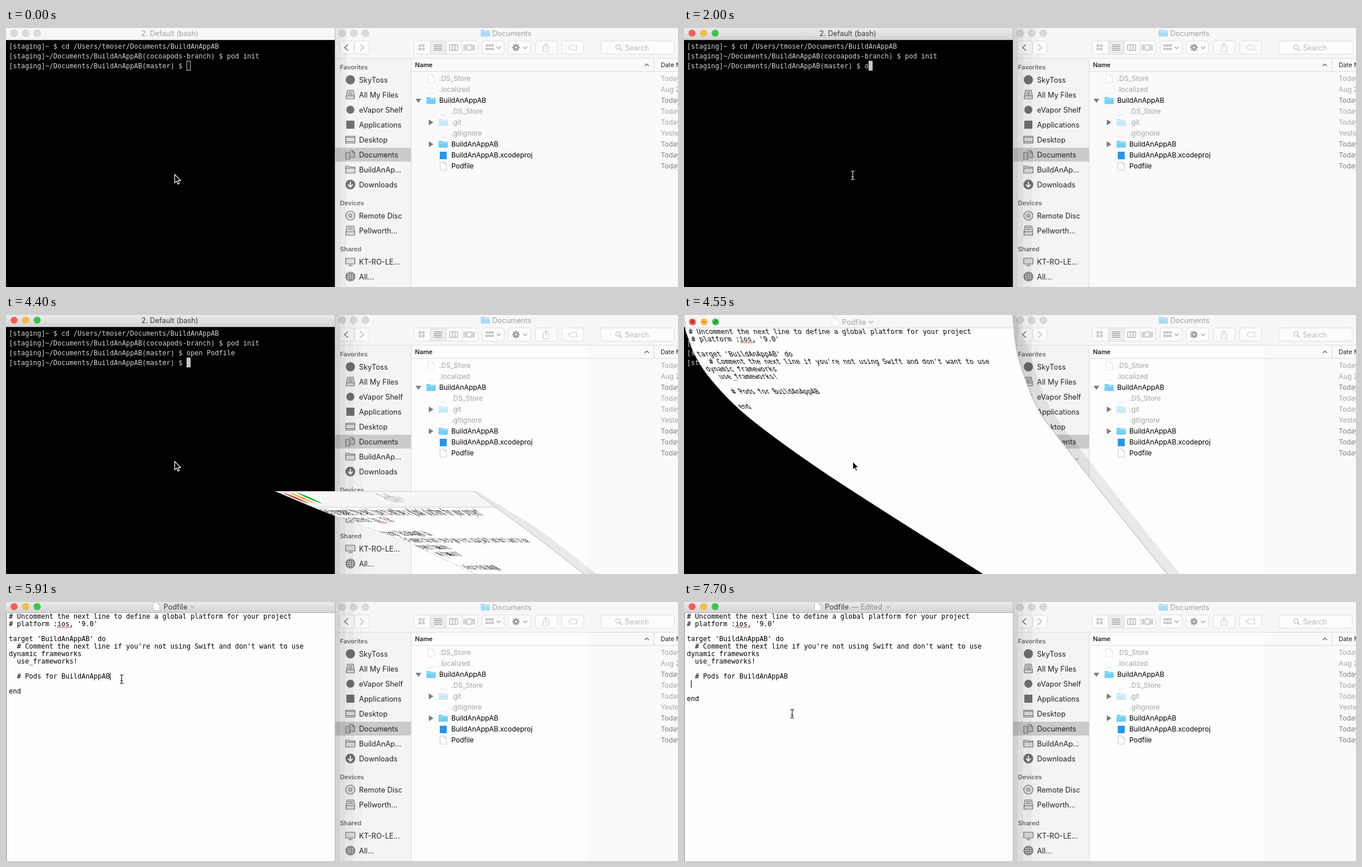
Recreate the animation shown at these times as an HTML page with a canvas. Size 1165 by 450 pixels, loop 7.99 s.

```html
<!DOCTYPE html>
<html lang="en">
<head>
<meta charset="utf-8">
<title>Opening a Podfile</title>
<style>
html, body { margin: 0; width: 100%; height: 100%; overflow: hidden; background: #000; }
canvas { display: block; }
</style>
</head>
<body>
<canvas id="stage" width="1165" height="450"></canvas>
<script>
const LOOP = 7990, W = 1165, H = 450, PANE = 570;
const screen = document.getElementById('stage').getContext('2d');
const sheet = document.createElement('canvas');
sheet.width = PANE;
sheet.height = H;
const sheetCtx = sheet.getContext('2d');
let g = screen;

// ---------- drawing helpers ----------
const UI = 'Inter, sans-serif';
const MONO = '"DejaVu Sans Mono", monospace';

function rect(x, y, w, h, color) {
  g.fillStyle = color;
  g.fillRect(x, y, w, h);
}
function text(s, x, cy, size, color, weight = 400, family = UI, align = 'left') {
  g.font = `${weight} ${size}px ${family}`;
  g.textAlign = align;
  g.fillStyle = color;
  g.fillText(s, x, Math.round(cy + size * 0.36));
}
function shape(d, x, y, stroke, fill, width = 1.2) {
  const p = new Path2D(d);
  g.save();
  g.translate(x, y);
  if (fill) { g.fillStyle = fill; g.fill(p); }
  if (stroke) { g.strokeStyle = stroke; g.lineWidth = width; g.stroke(p); }
  g.restore();
}
function disc(x, y, r, fill, stroke) {
  g.beginPath();
  g.arc(x, y, r, 0, 7);
  if (fill) { g.fillStyle = fill; g.fill(); }
  if (stroke) { g.strokeStyle = stroke; g.lineWidth = 1; g.stroke(); }
}
function button(x, w, fill = '#fcfcfc') {
  g.beginPath();
  g.roundRect(x + 0.5, 22.5, w - 1, 23, 4);
  g.fillStyle = fill;
  g.fill();
  g.strokeStyle = '#dedede';
  g.lineWidth = 1;
  g.stroke();
}
const chevron = (x, y, color) => shape('M-3.5-1.5L0 2L3.5-1.5', x, y, color);
const page = (x, y, edge) => shape('M-5.5-7H2L5.5-3.5V7H-5.5ZM2-7V-3.5H5.5', x, y, edge, '#fff', 0.8);
const folder = (x, y, color) => {
  shape('M-8-6H-2L-1-4.5H8V6H-8Z', x, y, null, color);
  rect(x - 8, y - 3, 16, 1, '#ffffff70');
};
function lights(x, y, on) {
  const colors = on ? ['#fc5b57', '#fdbc40', '#34c84a'] : ['#dadada', '#dadada', '#dadada'];
  colors.forEach((c, i) => disc(x + 20 * i, y, 6, c, on ? '#00000010' : '#cdcdcd'));
}
function titleBar(h, on) {
  const fade = g.createLinearGradient(0, 0, 0, h);
  fade.addColorStop(0, on ? '#ebebeb' : '#f8f8f8');
  fade.addColorStop(1, on ? '#d4d4d4' : '#f5f5f5');
  rect(0, 0, PANE, h, fade);
  rect(0, h, PANE, 1, on ? '#b4b4b4' : '#d8d8d8');
}

// ---------- file browser ----------
const INK = '#707070';
const ring = r => `M${r} 0A${r} ${r} 0 1 1 ${-r} 0A${r} ${r} 0 1 1 ${r} 0Z`;
const places = [
  [90, 'SkyToss', ring(8), 1],
  [116, 'All My Files', 'M-5-8H5L7 2V7H-7V2ZM-7 2H7M-3-5H3M-3.5-2.5H3.5M-4 0H4'],
  [142, 'eVapor Shelf', ring(7), 1],
  [168, 'Applications', 'M-7-7H7V7H-7Z', 1],
  [194, 'Desktop', 'M-8-6H8V6H-8ZM-8-4H8M-8 3.5H8'],
  [220, 'Documents', 'M-8-4H-1V8H-8ZM-2-7H4L7.5-3.5V5H-1M4-7V-3.5H7.5'],
  [246, 'BuildAnAp...', 'M-8-6H-2L-1-4.5H8V6H-8ZM-8-2.5H8'],
  [272, 'Downloads', ring(8.5), 1, 'M0-5V4M-4 0L0 4.5L4 0'],
  [326, 'Remote Disc', ring(8) + ring(2.5)],
  [352, 'Pellworth...', 'M-6-8H6L7.5 2V8H-7.5V2ZM-7.5 2H7.5M-4-5H4M-4.5-2H4.5'],
  [406, 'KT-RO-LE...', 'M-8-6H8V4H-8ZM-4 7H4M0 4V7'],
  [432, 'All...', ring(8.5), 1, 'M-8 0H8M0-8V8M-6-4Q0-1 6-4M-6 4Q0 1 6 4M-2-8Q-7 0-2 8M2-8Q7 0 2 8'],
];
const files = [
  ['.DS_Store', 0, 'page', 1],
  ['.localized', 0, 'bare', 1],
  ['BuildAnAppAB', 0, 'folder', 0, 'M-5-3H5L0 4Z'],
  ['.DS_Store', 1, 'bare', 1],
  ['.git', 1, 'folder', 1, 'M-3-5V5L5 0Z'],
  ['.gitignore', 1, 'bare', 1],
  ['BuildAnAppAB', 1, 'folder', 0, 'M-3-5V5L5 0Z'],
  ['BuildAnAppAB.xcodeproj', 1, 'project', 0],
  ['Podfile', 1, 'page', 0],
];

function toolbar() {
  rect(PANE, 0, W - PANE, 52, '#f7f7f7');
  rect(PANE, 52, W - PANE, 1, '#dcdcdc');
  lights(583, 9, false);
  folder(831, 9, '#a8dcf6');
  text('Documents', 843, 9, 12.65, '#a0a0a0');

  button(578, 26);
  button(604, 26);
  shape('M3-5.5L-3 0L3 5.5', 590, 34, '#6a6a6a', null, 1.4);
  shape('M-3-5.5L3 0L-3 5.5', 617, 34, '#bbb', null, 1.4);
  button(707, 111);
  rect(736, 23, 27, 22, '#ececec');
  for (const x of [735, 763, 790]) rect(x, 23, 1, 22, '#dedede');
  const grey = '#9c9c9c';
  for (let i = 0; i < 4; i++) shape('M0 0H3V3H0Z', 716 + i % 2 * 6, 29 + (i >> 1) * 6, grey, null, 1);
  shape('M-7-4.5H7M-7-1.5H7M-7 1.5H7M-7 4.5H7', 749, 34, '#8c8c8c', null, 1);
  shape('M-7-5H7V5H-7ZM-2.5-5V5M2.5-5V5', 776, 34, grey, null, 1);
  shape('M-4-4.5H4V4.5H-4ZM-9-5V5M-6.5-5V5M6.5-5V5M9-5V5', 803, 34, grey, null, 1);
  button(825, 39);
  for (let i = 0; i < 6; i++) shape('M0 0H3V2.5H0Z', 832 + i % 3 * 5, 29 + (i > 2) * 6, grey, null, 1);
  chevron(854, 34, grey);
  button(870, 40);
  disc(884, 34, 4.5, grey);
  for (let i = 0; i < 8; i++) {
    const a = i * Math.PI / 4;
    disc(884 + 5.3 * Math.cos(a), 34 + 5.3 * Math.sin(a), 1.4, grey);
  }
  disc(884, 34, 1.8, '#fcfcfc');
  chevron(900, 34, grey);
  button(917, 39);
  shape('M-2-2H-5V7H5V-2H2M0 3V-7M-3-4L0-7L3-4', 936, 34, '#cfcfcf');
  button(963, 39);
  shape('M-7 0L-3-4H7V4H-3Z', 982, 34, '#cfcfcf');
  button(1031, 128);
  disc(1061, 33, 4, null, '#b5b5b5');
  shape('M0 0L4 4', 1064, 36, '#b5b5b5');
  text('Search', 1073, 34, 12.6, '#b9b9b9');
}

function sidebar() {
  rect(PANE, 53, 132, H - 53, '#f4f4f4');
  rect(PANE, 208, 132, 24, '#cacaca');
  rect(702, 53, 1, H - 53, '#dadada');
  text('Favorites', 579, 68, 10.8, '#6c6c6c', 600);
  text('Devices', 579, 304, 10.8, '#6c6c6c', 600);
  text('Shared', 579, 384, 10.8, '#6c6c6c', 600);
  for (const [y, name, d, solid, mark] of places) {
    shape(d, 597, y, solid ? null : INK, solid ? INK : '#00000018');
    if (mark) shape(mark, 597, y, '#f4f4f4', null, name === 'Downloads' ? 2 : 0.8);
    text(name, 612, y, 12.65, '#222');
  }
}

function fileList(t) {
  rect(703, 53, W - 703, H - 53, '#fafafa');
  if (t >= 4400) rect(703, 53, 304, H - 53, '#fdfdfd');
  rect(703, 75, W - 703, 1, '#dcdcdc');
  rect(1123, 54, 1, 21, '#d8d8d8');
  text('Name', 709, 64, 10.8, '#222', 600);
  text('Date Modified', 1135, 64, 10.8, '#222');
  shape('M-3.5 2L0-1.5L3.5 2', 1111, 64, '#555');
  files.forEach(([name, depth, kind, dim, arrow], i) => {
    const y = 88 + 19 * i, x = 751 + 21 * depth;
    if (arrow) shape(arrow, x - 36, y, null, '#7b7b7b');
    if (kind === 'folder') folder(x - 14, y, dim ? '#c6eafb' : '#72cff8');
    if (kind === 'page') page(x - 14, y, dim ? '#ddd' : '#bbb');
    if (kind === 'bare') rect(x - 19, y + 6, 10, 1, '#e2e2e2');
    if (kind === 'project') rect(x - 20, y - 6, 12, 13, '#2196f3');
    text(name, x, y, 11.9, dim ? '#a3a3a3' : '#000');
    const day = i === 1 ? 'Aug 2' : i === 5 ? 'Yesterday' : 'Today,';
    text(day, 1135, y, 11.9, dim ? '#a6a6a6' : '#808080');
  });
}

function browser(t) {
  toolbar();
  sidebar();
  fileList(t);
  const bands = t < 500 ? [[581, .07], [590, .045]] : [[579, .14], [588, .09], [603, .05], [617, .015]];
  let x = PANE;
  for (const [end, a] of bands) {
    rect(x, 0, end - x, H, `rgba(0,0,0,${a})`);
    x = end;
  }
  rect(PANE, 0, 1, H, '#b8b8b8');
}

// ---------- terminal ----------
// Number of equal steps done between two times; the first falls on `from`.
function stepsDone(t, from, to, n) {
  if (t < from) return 0;
  return t >= to ? n : 1 + Math.floor((t - from) / (to - from) * (n - 1));
}
function typed(t) {
  const first = stepsDone(t, 2000, 2600, 5);
  const second = stepsDone(t, 3050, 3800, 6);
  return 'open Podfile'.slice(0, first + second + (second > 3));
}
function terminal(t) {
  const on = t >= 500;
  rect(0, 0, PANE, H, '#000');
  titleBar(20, on);
  lights(14, 9, on);
  text('2. Default (bash)', 284, 9, 12.5, on ? '#3c3c3c' : '#a0a0a0', 400, UI, 'center');
  const prompt = '[staging]~/Documents/BuildAnAppAB(master) $ ';
  const lines = [
    '[staging]~ $ cd /Users/tmoser/Documents/BuildAnAppAB',
    '[staging]~/Documents/BuildAnAppAB(cocoapods-branch) $ pod init',
    prompt + typed(t),
  ];
  if (t >= 4250) lines.push(prompt);
  lines.forEach((s, i) => text(s, 5, 32 + 17 * i, 11.63, '#d2d2d2', 400, MONO));
  const last = lines.length - 1;
  const x = 5 + 7 * lines[last].length, y = 23 + 17 * last;
  if (on) rect(x, y, 7, 17, '#c7c7c7');
  else {
    g.strokeStyle = '#c7c7c7';
    g.lineWidth = 1;
    g.strokeRect(x + 0.5, y + 0.5, 6, 16);
  }
}

// ---------- editor ----------
const podfile = [
  '# Uncomment the next line to define a global platform for your project',
  "# platform :ios, '9.0'",
  '',
  "target 'BuildAnAppAB' do",
  "  # Comment the next line if you're not using Swift and don't want to use",
  'dynamic frameworks',
  '  use_frameworks!',
  '',
  '  # Pods for BuildAnAppAB',
  '',
  'end',
];
function caretAt(t) {
  if (t < 4880) return null;
  if (t < 5470) return [5, 25];
  if (t < 5910) return null;
  if (t < 6510) return [180, 129];
  if (t < 7110) return [5, 142];
  return t < 7250 || t >= 7700 ? [12, 142] : null;
}
function editor(t) {
  const on = t >= 4880, edit = stepsDone(t, 6510, 6810, 3) / 3;
  rect(0, 0, PANE, H, '#fefefe');
  titleBar(18, on);
  lights(14, 8, true);
  if (!on) {
    shape('M-2.5-2.5L2.5 2.5M2.5-2.5L-2.5 2.5', 14, 8, '#7a1512');
    shape('M-3 0H3', 34, 8, '#93590b');
    shape('M-2.5-1V2.5H1ZM2.5 1V-2.5H-1Z', 54, 8, null, '#0b5a17');
  }
  const shift = 29 * edit, soft = '#a3a3a3';
  page(261 - shift, 8, on ? '#bbb' : '#ddd');
  text('Podfile', 273 - shift, 8, 12.65, on ? '#3c3c3c' : soft);
  if (edit) {
    g.globalAlpha = edit;
    text('— Edited', 319 - shift, 8, 12.65, '#8e8e8e');
    g.globalAlpha = 1;
  }
  chevron(323 + 31 * edit, 8, soft);

  podfile.forEach((s, i) => {
    const row = i + (edit && i > 8 ? 1 : 0);
    text(s, 5, 25 + 13 * row, 11.63, '#000', 400, MONO);
  });
  for (let x = 89; x < 111; x += 3) rect(x, 43, 2, 2, '#f0605a');
  const caret = caretAt(t);
  if (caret) rect(caret[0], caret[1] - 6, 1, 13, '#000');
  rect(0, 19, 1, H, '#777');
}

// Smooth curve through points [y, x], read at height y.
function curve(pts, y) {
  const slope = i => {
    const a = pts[Math.max(0, i - 1)], b = pts[Math.min(pts.length - 1, i + 1)];
    return (b[1] - a[1]) / (b[0] - a[0]);
  };
  let i = 0;
  while (i < pts.length - 2 && y > pts[i + 1][0]) i++;
  const [y0, x0] = pts[i], [y1, x1] = pts[i + 1];
  const h = y1 - y0, u = (y - y0) / h, v = 1 - u;
  return v * v * (1 + 2 * u) * x0 + u * u * (1 + 2 * v) * x1 +
    u * v * h * (v * slope(i) - u * slope(i + 1));
}
const early = {
  top: 306,
  row: y => y < 344 ? (y - 306) * 25 / 38 : 25 + (y - 344) / 0.91,
  left: [[306, 467], [343, 556], [391, 686], [438, 789], [450, 815]],
  right: [[306, 812], [343, 862], [391, 927], [450, 1003]],
};
const late = {
  top: 0,
  row: y => Math.max(0, y - 4),
  left: [[0, 0], [24, 2], [42, 8], [68, 18], [107, 43], [159, 91], [210, 154], [285, 261], [450, 519]],
  right: [[0, 570], [60, 577], [120, 595], [170, 618], [220, 655], [285, 706], [450, 838]],
};
function swoop({ top, row, left, right }, t) {
  g = sheetCtx;
  editor(t);
  g = screen;
  for (let y = top; y < H; y++) {
    const l = curve(left, y), r = curve(right, y);
    rect(r, y, 5 + 17 * Math.min(1, (y - top) / 60), 1, 'rgba(0,0,0,.08)');
    g.drawImage(sheet, 0, row(y), PANE, 1, l, y, r - l, 1);
    rect(r - 1, y, 1.5, 1, '#bdbdbd');
    rect(l, y, 1.5, 1, '#d4d4d4');
  }
  if (top) rect(left[0][1], top, right[0][1] - left[0][1], 1, '#d0d0d0');
}

// ---------- pointer ----------
function pointer(t) {
  if (t < 500 || (t >= 4400 && t < 4700)) {
    shape('M0 0V14.5L3.4 11.4L5.6 16.8L8 15.8L5.8 10.6H10.4Z', 292.5, 254.5, '#fff', '#000', 1.2);
    return;
  }
  let x = 292, y = 256;
  if (t >= 4700) {
    const u = Math.min(1, stepsDone(t, 5170, 5910, 6) / 5), s = u * u * (3 - 2 * u);
    const v = stepsDone(t, 7110, 7250, 2) / 2;
    x = Math.round(293 - 93 * s - 13 * v);
    y = Math.round(256 - 122 * s + 60 * v);
  }
  const beam = 'M-3-7.5H-1.5L0-6L1.5-7.5H3M0-6V6M-3 7.5H-1.5L0 6L1.5 7.5H3M-2 2.5H2';
  shape(beam, x + 0.5, y, t < 4700 ? '#e4e4e4' : '#111', null, 1.1);
}

function draw(now) {
  const t = now % LOOP;
  browser(t);
  if (t < 4700) terminal(t);
  if (t >= 4700) {
    editor(t);
    rect(PANE, 0, 1, H, '#b8b8b8');
  } else if (t >= 4550) swoop(late, t);
  else if (t >= 4400) swoop(early, t);
  pointer(t);
}

const start = performance.now();
function tick() {
  draw(performance.now() - start);
  requestAnimationFrame(tick);
}
tick();
</script>
</body>
</html>
```
